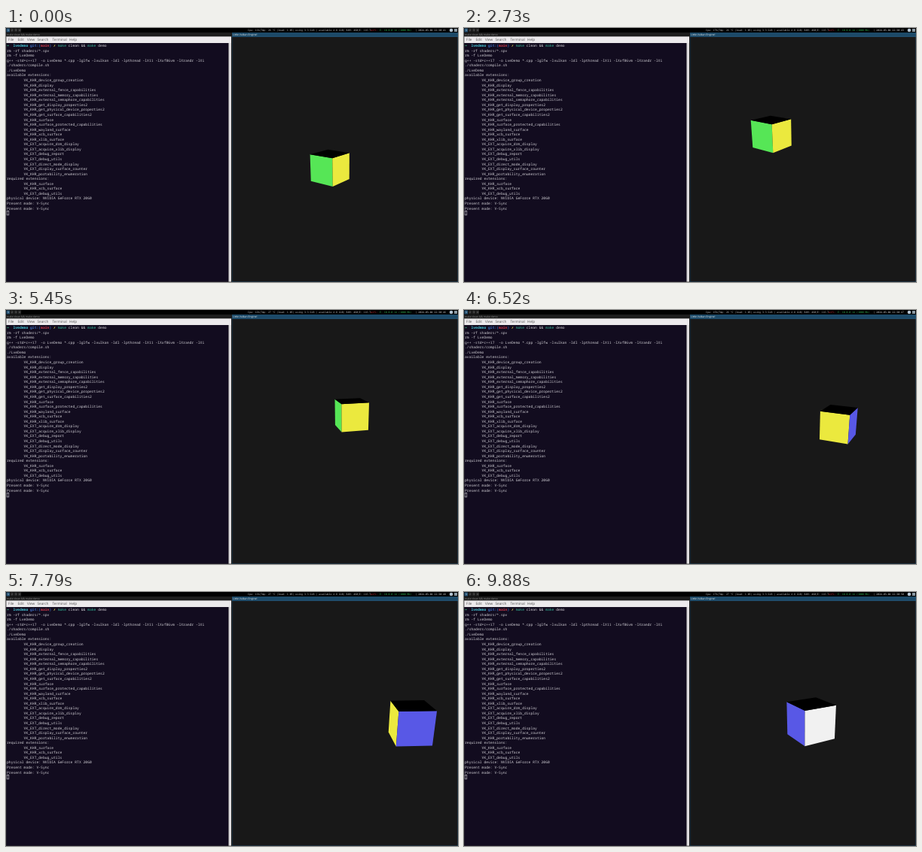
An HTML page with a canvas for the animation above (9910 ms loop, 600 by 338 pixels).

```html
<!DOCTYPE html>
<html lang="en">
<head>
<meta charset="utf-8">
<title>Vulkan cube demo</title>
<style>
  html, body { margin: 0; width: 100%; height: 100%; overflow: hidden; background: #000; }
  canvas { display: block; }
</style>
</head>
<body>
<canvas id="stage" width="600" height="338"></canvas>
<script>
const LOOP = 9910;
const MONO = '"Noto Sans Mono", "DejaVu Sans Mono", monospace';
const SANS = '"Noto Sans", sans-serif';
const ctx = document.getElementById('stage').getContext('2d');
ctx.textRendering = 'geometricPrecision';

function rect(x, y, w, h, color) {
  ctx.fillStyle = color;
  ctx.fillRect(x, y, w, h);
}

function border(x, y, w, h, color, width) {
  ctx.strokeStyle = color;
  ctx.lineWidth = width;
  ctx.strokeRect(x + width / 2, y + width / 2, w - width, h - width);
}

// Text is set ten times larger and scaled down so advances stay fractional.
function text(str, x, y, size, color, font = MONO, weight = 400) {
  ctx.save();
  ctx.translate(x, y);
  ctx.scale(0.1, 0.1);
  ctx.font = `${weight} ${size * 10}px ${font}`;
  ctx.fillStyle = color;
  ctx.fillText(str, 0, 0);
  ctx.restore();
}

// ---- Terminal ----
const CELL = 2.82, ROW = 6.56, FG = '#d2d0d6';

const khr = ['device_group_creation', 'display', 'external_fence_capabilities',
  'external_memory_capabilities', 'external_semaphore_capabilities',
  'get_display_properties2', 'get_physical_device_properties2',
  'get_surface_capabilities2', 'surface', 'surface_protected_capabilities',
  'wayland_surface', 'xcb_surface', 'xlib_surface'];
const ext = ['acquire_drm_display', 'acquire_xlib_display', 'debug_report',
  'debug_utils', 'direct_mode_display', 'display_surface_counter'];

const output = [
  'rm -rf shaders/*.spv',
  'rm -f LveDemo',
  'g++ -std=c++17  -o LveDemo *.cpp -lglfw -lvulkan -ldl -lpthread -lX11 -lXxf86vm -lXrandr -lXi',
  './shaders/compile.sh',
  './LveDemo',
  'available extensions:',
  ...khr.map(name => '\tVK_KHR_' + name),
  ...ext.map(name => '\tVK_EXT_' + name),
  '\tVK_KHR_portability_enumeration',
  'required extensions:',
  '\tVK_KHR_surface', '\tVK_KHR_xcb_surface', '\tVK_EXT_debug_utils',
  'physical device: NVIDIA GeForce RTX 2060',
  'Present mode: V-Sync',
  'Present mode: V-Sync'
];

const prompt = [
  [0, '➜', '#3fd08a', 700], [3, 'lvedemo', '#45c8d8', 700], [11, 'git:(', '#3d6fc4', 700],
  [16, 'main', '#d03a4c', 700], [20, ')', '#3d6fc4', 700], [22, '✗', '#d8c850', 700],
  [24, 'make', '#35b89a'], [29, 'clean && ', FG], [38, 'make', '#35b89a'], [43, 'demo', FG]
];

function cell(str, col, row, color = FG, weight = 400) {
  text(str, 1 + col * CELL, 25.1 + row * ROW, 4.7, color, MONO, weight);
}

function drawTerminal() {
  rect(0, 6, 300, 5, '#1c1c1c');
  text('make clean && make demo', 1, 10.2, 3.4, '#888', SANS);
  rect(0, 11, 299, 9, '#eceaec');
  [['File', 3], ['Edit', 15.5], ['View', 28], ['Search', 41.5], ['Terminal', 61.5], ['Help', 84]]
    .forEach(([label, x]) => text(label, x, 17.4, 4.7, '#5a5a5a', SANS));
  rect(0, 20, 295.5, 318, '#120c1f');
  rect(295.5, 20, 3.5, 318, '#dedcde');
  border(0, 11, 300, 327, '#333', 0.4);
  prompt.forEach(([col, str, color, weight]) => cell(str, col, 0, color, weight));
  output.forEach((line, i) => cell(line.trim(), line[0] === '\t' ? 8 : 0, i + 1));
  border(0.9, 243, 3.2, 6.2, FG, 0.6);
}

// ---- Status bar ----
function drawStatus(time) {
  const sec = Math.floor(time / 1000);
  const put = (str, x, color) => text(str, x, 4.2, 3.2, color);
  rect(0, 0, 600, 6, '#000');
  for (let i = 0; i < 4; i++) {
    rect(0.5 + i * 5, 0.5, 4.6, 5, i ? '#262626' : '#285577');
    text(String(i + 1), 2 + i * 5, 4.3, 3.3, i ? '#888' : '#fff');
  }
  put(`Cpu: ${11 + sec * 3 % 7}%|Tmp: 2${6 + sec % 2} °C |load: 1.05| using 3.3 GiB | ` +
    'available 4.8 GiB| RAM: 460|E: 116.7', 321, '#c4c4c4');
  put('wifi:', 484, '#c0242c');
  put('E: 10.0.0.14 (1000 Mb)', 496, '#32b852');
  put(`| 2024-03-04 22:30:${41 + sec}`, 543.5, '#d8d8d8');
  ctx.fillStyle = '#b4c4d2';
  ctx.beginPath();
  ctx.arc(591, 3, 2.3, 0, Math.PI * 2);
  ctx.fill();
  rect(595, 1, 4, 4, '#8c9aa4');
}

// ---- Cube ----
const FOCAL = 350, CENTER_X = 450, CENTER_Y = 175;

// time, screen x, screen y, distance, yaw and camera pitch in degrees
const poses = [
  [0, 430.3, 185, 9.55, -54.7, 14],
  [1000, 427, 210, 9.55, -54.4, 10],
  [1450, 424, 246, 9.5, -54.2, 4],
  [2000, 418, 208, 9.5, -53.9, 10],
  [2730, 408.5, 140.2, 9.5, -53.3, 21],
  [3900, 426, 157, 9.6, -43, 18],
  [5450, 458.3, 138.9, 9.75, -15.3, 18.8],
  [6520, 497.4, 151, 9.1, 25, 22],
  [7790, 537.2, 173.5, 7.45, 87, 21],
  [8520, 434.3, 177, 7.4, 105, 21],
  [9300, 466, 173, 7.5, 130, 20],
  [9880, 460.2, 170.8, 7.55, 149, 20]
];

// Corner bits: 1 = right, 2 = bottom, 4 = back; the bottom face is never seen.
const faces = [
  ['#56e656', 0, 2, 6, 4],
  ['#ebe93e', 0, 1, 3, 2],
  ['#5858e6', 1, 5, 7, 3],
  ['#f1f1f1', 4, 6, 7, 5],
  ['#000000', 0, 4, 5, 1]
];

const secant = (i, k) =>
  (poses[i + 1][k] - poses[i][k]) / (poses[i + 1][0] - poses[i][0]);

function tangent(i, k) {
  if (i === 0) return secant(0, k);
  if (i === poses.length - 1) return secant(i - 1, k);
  const a = secant(i - 1, k), b = secant(i, k);
  return a * b > 0 ? 2 * a * b / (a + b) : 0;
}

// Monotone cubic interpolation between poses.
function poseAt(time) {
  let i = 0;
  while (i < poses.length - 2 && time >= poses[i + 1][0]) i++;
  const span = poses[i + 1][0] - poses[i][0];
  const u = Math.min(1, (time - poses[i][0]) / span), v = 1 - u;
  return [1, 2, 3, 4, 5].map(k =>
    poses[i][k] * v * v * (1 + 2 * u) + poses[i + 1][k] * u * u * (3 - 2 * u) +
    span * u * v * (tangent(i, k) * v - tangent(i + 1, k) * u));
}

function projectCorners([cx, cy, dist, yawDeg, pitchDeg]) {
  const yaw = yawDeg * Math.PI / 180, pitch = pitchDeg * Math.PI / 180;
  return Array.from({ length: 8 }, (_, i) => {
    const x = (i & 1) - 0.5, y = (i >> 1 & 1) - 0.5, z = (i >> 2) - 0.5;
    const turnedX = x * Math.cos(yaw) + z * Math.sin(yaw);
    const turnedZ = z * Math.cos(yaw) - x * Math.sin(yaw);
    const tiltedY = y * Math.cos(pitch) - turnedZ * Math.sin(pitch);
    const depth = dist + y * Math.sin(pitch) + turnedZ * Math.cos(pitch);
    return [
      CENTER_X + ((cx - CENTER_X) * dist + FOCAL * turnedX) / depth,
      CENTER_Y + ((cy - CENTER_Y) * dist + FOCAL * tiltedY) / depth
    ];
  });
}

function drawScene(time) {
  rect(300, 6, 300, 6, '#1d4a68');
  text('Little Vulkan Engine!', 301, 10.2, 3.4, '#e4ecf0', SANS);
  rect(300, 12, 300, 326, '#181818');
  border(300, 11, 300, 327, '#285577', 0.4);
  const corners = projectCorners(poseAt(time));
  for (const [color, ...ids] of faces) {
    const [a, b, c, d] = ids.map(id => corners[id]);
    const area = (c[0] - a[0]) * (d[1] - b[1]) - (c[1] - a[1]) * (d[0] - b[0]);
    if (area <= 0) continue;
    ctx.beginPath();
    [a, b, c, d].forEach(p => ctx.lineTo(p[0], p[1]));
    ctx.fillStyle = color;
    ctx.fill();
  }
}

function frame() {
  const time = performance.now() % LOOP;
  rect(0, 0, 600, 338, '#000');
  drawStatus(time);
  drawTerminal();
  drawScene(time);
  requestAnimationFrame(frame);
}
frame();
</script>
</body>
</html>
```
